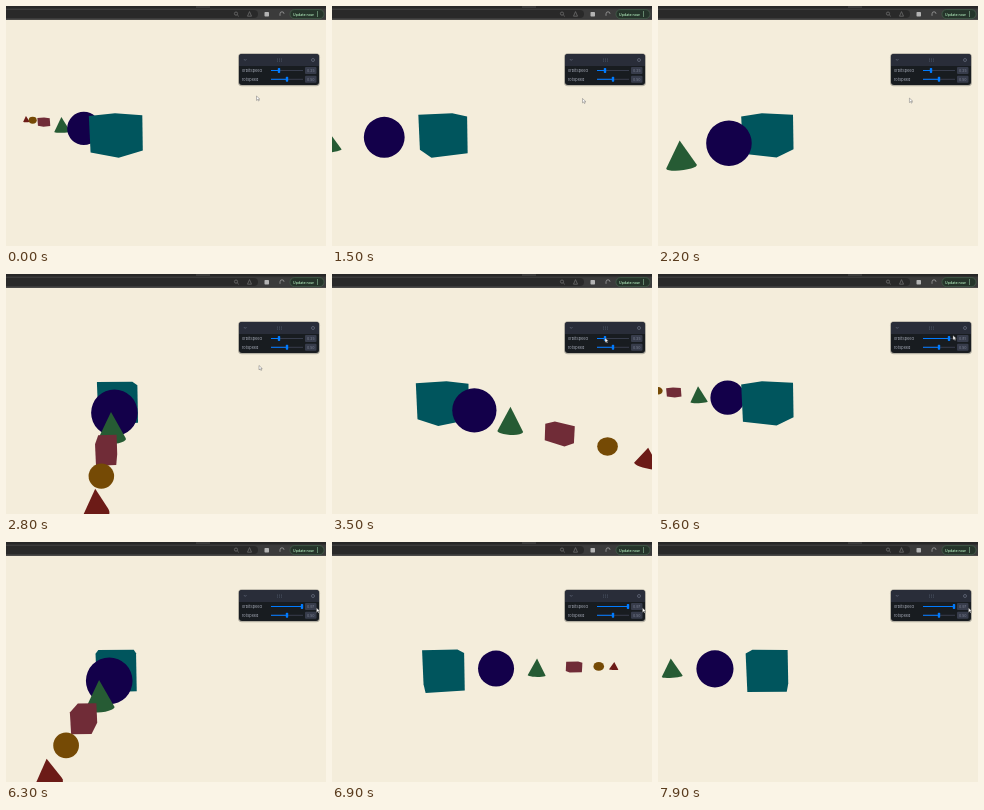
An HTML page that plays this animation: 320 px wide and 240 px high, repeating every 8 s.

```html
<!DOCTYPE html>
<html lang="en">
<head>
<meta charset="utf-8">
<title>Orbiting shapes</title>
<style>
  html, body { margin: 0; width: 100%; height: 100%; overflow: hidden; background: #f4eddb; }
  svg { display: block; width: 320px; height: 240px; }
  text { font-family: Inter, "Open Sans", sans-serif; }
  .label { font-size: 3.8px; fill: #a9aebb; }
  .value { font-size: 3.6px; fill: #7b8192; }
</style>
</head>
<body>
<svg viewBox="0 0 320 240">
  <rect width="320" height="240" fill="#f4eddb"/>
  <g id="scene"></g>

  <g id="toolbar">
    <rect width="320" height="14" fill="#272727"/>
    <rect y="2.5" width="320" height="10.5" fill="#3b3b3b"/>
    <rect x="190" width="14" height="2" fill="#3b3b3b"/>
    <rect y="13" width="320" height="1" fill="#4c4b49"/>
    <rect x="-6" y="4" width="258" height="8" rx="4" fill="#292929"/>
    <g fill="none" stroke="#6c6c6c" stroke-width=".8">
      <circle cx="230" cy="7.6" r="1.6"/>
      <path d="M231.2 8.8l1.6 1.6M241.5 10.2l2-4.6 2 4.6z"/>
      <path d="M274 9.8v-2a2 2 0 0 1 4 0" stroke="#a0a0a0"/>
    </g>
    <rect x="258.5" y="6" width="4.5" height="4.5" rx=".7" fill="#b4b4b4"/>
    <rect x="284" y="3.6" width="34" height="9" rx="4.5" fill="#25342a" stroke="#4e7558" stroke-width=".5"/>
    <text x="287" y="9.5" font-size="3.6" font-weight="600" fill="#a3d9ae">Update now</text>
    <path d="M311.5 5.5v5" stroke="#a3d9ae" stroke-width="1" stroke-dasharray="1 1"/>
  </g>

  <g id="panel">
    <rect x="232" y="47.3" width="82" height="33" rx="4" fill="#3a3a38" opacity=".35"/>
    <rect x="233" y="48" width="80" height="31" rx="3" fill="#181c20"/>
    <path d="M233 60V51a3 3 0 0 1 3-3H310a3 3 0 0 1 3 3V60z" fill="#292d39"/>
    <path d="M238 53.2l1.2 1.2 1.2-1.2" fill="none" stroke="#6c7284" stroke-width=".7"/>
    <g fill="#535a6c">
      <circle cx="271.5" cy="53" r=".55"/><circle cx="273.5" cy="53" r=".55"/><circle cx="275.5" cy="53" r=".55"/>
      <circle cx="271.5" cy="55" r=".55"/><circle cx="273.5" cy="55" r=".55"/><circle cx="275.5" cy="55" r=".55"/>
    </g>
    <circle cx="307" cy="54" r="1.5" fill="none" stroke="#6c7284" stroke-width=".7"/>
    <text class="label" x="236" y="65.8">orbitSpeed</text>
    <text class="label" x="236" y="74.6">rotSpeed</text>
    <g fill="#373c4b">
      <rect x="265" y="64" width="32" height="1"/>
      <rect x="265" y="72.8" width="32" height="1"/>
      <rect x="299" y="61" width="11.5" height="7" rx="1"/>
      <rect x="299" y="69.8" width="11.5" height="7" rx="1"/>
    </g>
    <g fill="#007bff">
      <rect id="fill" x="265" y="64" width="8" height="1"/>
      <rect id="thumb" y="62" width="2.4" height="5" rx=".7"/>
      <rect x="265" y="72.8" width="16" height="1"/>
      <rect x="279.8" y="70.8" width="2.4" height="5" rx=".7"/>
    </g>
    <text id="value" class="value" x="301" y="65.8"></text>
    <text class="value" x="301" y="74.6">0.50</text>
  </g>
  <path id="cursor" d="M0 0v4.4l1.1-1 .8 1.6.8-.4-.8-1.5h1.4z" fill="#fff" stroke="#555" stroke-width=".4"/>
</svg>
<script>
const LOOP = 8000, STEP = 100;
const FOCAL = 270, SIN = 0.164, COS = 0.986, LEAN = 0.01;
const CENTER = { x: 160, y: 127.7 }, SHIFT = 49.3;
const LEAD = 6 * Math.PI / 180; // the cube is turned slightly ahead of the arm

// Rows of time, value(s)
const ANGLE = [[0, 218], [1500, 155], [2800, 81.7], [3600, 46], [4500, -5], [5600, -154],
  [6300, -274], [6900, -371], [7200, -428], [7900, -538], [8000, -554]];
const SLIDER = [[0, 273], [3900, 273], [4500, 286], [5600, 291], [6200, 296], [8000, 296]];
const CURSOR = [[0, 250.5, 90], [500, 250.5, 92.5], [1900, 250.5, 92.5], [2700, 253, 91.5],
  [2900, 253, 91.5], [3500, 273, 64], [3900, 273, 64], [4500, 290.5, 60.5],
  [5600, 295, 61.5], [6200, 310.5, 66], [8000, 310.5, 66]];

// Size is half length along the arm, half height, half width
const SHAPES = [
  { kind: 'box', r: 0, turn: -LEAD, size: [18.4, 18.2, 18.4], color: '#00555d' },
  { kind: 'ball', r: 54.5, size: [18.7, 18.7, 18.7], color: '#13004a' },
  { kind: 'cone', r: 99, size: [9.5, 9.8, 9], color: '#265b34' },
  { kind: 'box', r: 142, size: [7.2, 5.2, 4.6], color: '#702c37' },
  { kind: 'ball', r: 172, size: [6, 4.8, 4.8], color: '#754a05' },
  { kind: 'cone', r: 191, size: [5.2, 4.6, 4], color: '#6c1b17' }
];

const byId = id => document.getElementById(id);
const scene = byId('scene');
for (const s of SHAPES) {
  s.node = document.createElementNS('http://www.w3.org/2000/svg', 'path');
  s.node.setAttribute('fill', s.color);
  s.points = outline(s);
}

// Local points whose convex hull is the silhouette
function outline({ kind, size: [l, h, w] }) {
  const pts = [];
  if (kind === 'box') {
    for (const i of [-1, 1]) for (const j of [-1, 1]) for (const k of [-1, 1]) pts.push([i * l, j * h, k * w]);
  } else if (kind === 'cone') {
    pts.push([0, -h, 0]);
    for (let a = 0; a < 24; a++) {
      const t = a * Math.PI / 12;
      pts.push([l * Math.cos(t), h * 0.85, w * Math.sin(t)]);
    }
  }
  return pts;
}

function project(x, h, z) {
  const k = FOCAL / (FOCAL - COS * z + SIN * h);
  return { x: CENTER.x + (x - SHIFT) * k, y: CENTER.y + (COS * h + SIN * z + LEAN * x) * k, k };
}

function hull(pts) {
  pts.sort((a, b) => a.x - b.x || a.y - b.y);
  const half = list => {
    const out = [];
    for (const p of list) {
      while (out.length > 1) {
        const [a, b] = out.slice(-2);
        if ((b.x - a.x) * (p.y - a.y) - (b.y - a.y) * (p.x - a.x) > 0) break;
        out.pop();
      }
      out.push(p);
    }
    return out.slice(0, -1);
  };
  return [...half(pts), ...half([...pts].reverse())];
}

function shapePath(s, angle) {
  const a = angle + (s.turn || 0), c = Math.cos(a), n = Math.sin(a);
  if (s.kind === 'ball') {
    const p = project(s.r * c, 0, s.r * n);
    const rx = Math.hypot(s.size[0] * c, s.size[2] * n) * p.k, ry = s.size[1] * p.k;
    return `M${p.x - rx} ${p.y}a${rx} ${ry} 0 1 0 ${2 * rx} 0a${rx} ${ry} 0 1 0 ${-2 * rx} 0z`;
  }
  const pts = s.points.map(([u, h, v]) => project((s.r + u) * c - v * n, h, (s.r + u) * n + v * c));
  return 'M' + hull(pts).map(p => `${p.x.toFixed(2)} ${p.y.toFixed(2)}`).join('L') + 'z';
}

function segment(rows, t) {
  let i = 0;
  while (i < rows.length - 2 && t >= rows[i + 1][0]) i++;
  return [i, (t - rows[i][0]) / (rows[i + 1][0] - rows[i][0])];
}

function linear(rows, t, col = 1) {
  const [i, u] = segment(rows, t);
  return rows[i][col] + (rows[i + 1][col] - rows[i][col]) * u;
}

function smooth(rows, t) {
  const [i, u] = segment(rows, t);
  const slope = j => {
    const a = rows[Math.max(j - 1, 0)], b = rows[Math.min(j + 1, rows.length - 1)];
    return (b[1] - a[1]) / (b[0] - a[0]);
  };
  const [t0, a] = rows[i], [t1, b] = rows[i + 1], d = t1 - t0, v = 1 - u;
  return a * v * v * (1 + 2 * u) + b * u * u * (3 - 2 * u) + d * u * v * (v * slope(i) - u * slope(i + 1));
}

function draw(t) {
  const angle = smooth(ANGLE, t) * Math.PI / 180, depth = Math.sin(angle);
  for (const s of SHAPES) s.node.setAttribute('d', shapePath(s, angle));
  scene.replaceChildren(...[...SHAPES].sort((a, b) => (a.r - b.r) * depth).map(s => s.node));

  const x = linear(SLIDER, t);
  byId('fill').setAttribute('width', x - 265);
  byId('thumb').setAttribute('x', x - 1.2);
  byId('value').textContent = ((x - 265) / 32).toFixed(2);
  byId('cursor').setAttribute('transform', `translate(${linear(CURSOR, t)} ${linear(CURSOR, t, 2)})`);
}

const start = performance.now();
function tick() {
  const t = (performance.now() - start) % LOOP;
  draw(Math.floor(t / STEP) * STEP);
  requestAnimationFrame(tick);
}
tick();
</script>
</body>
</html>
```
